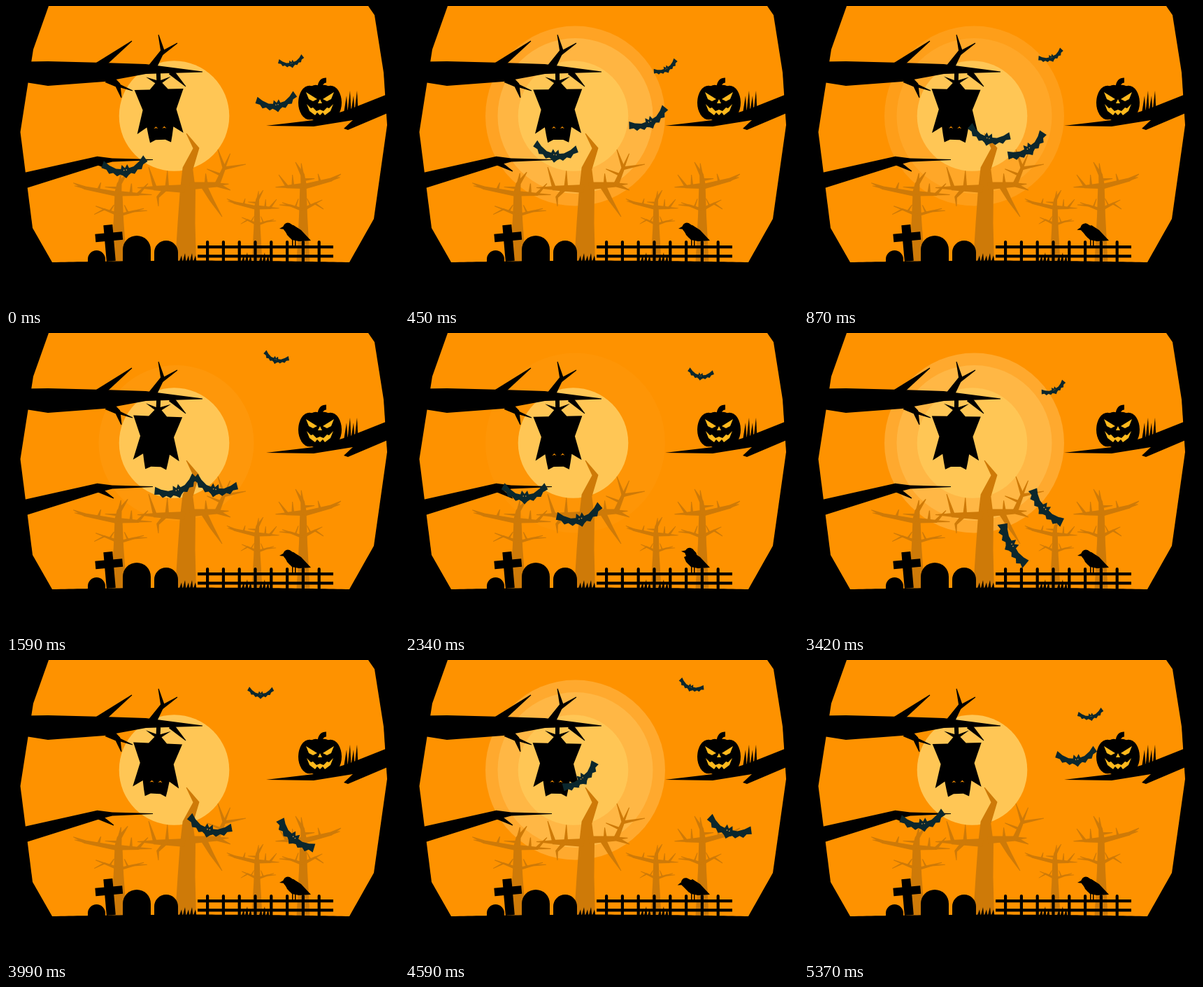
An HTML page with a canvas that plays this animation: 562x427 px, repeating every 5400 ms.

```html
<!DOCTYPE html>
<html lang="en">
<head>
<meta charset="utf-8">
<title>Halloween night</title>
<style>
html, body { margin: 0; width: 100%; height: 100%; overflow: hidden; background: #000; }
canvas { display: block; width: 562px; height: 427px; }
</style>
</head>
<body>
<canvas id="stage" width="562" height="427"></canvas>
<script>
const ctx = document.getElementById('stage').getContext('2d');
const LOOP = 5400, LAP = LOOP / 2, BEAT = LOOP / 4, BLINK = LOOP / 6, STEP = 30;
const TAU = Math.PI * 2, RAD = Math.PI / 180;
const INK = '#000', SKY = '#fe9200', MOON = '#ffc655', TREE = '#ce7a08', NIGHT = '#0b272d', FIRE = '#ffb91d';

const clamp = v => Math.min(1, Math.max(0, v));
const pulse = (t, a, b, c, d) => clamp((t - a) / (b - a)) * clamp((d - t) / (d - c));
const wave = (t, period, shift = 0) => Math.cos(TAU * t / period - shift * RAD);

function poly(color, p) {
  ctx.fillStyle = color;
  ctx.beginPath();
  for (let i = 0; i < p.length; i += 2) ctx.lineTo(p[i], p[i + 1]);
  ctx.closePath();
  ctx.fill();
}

// Closed outline from its right half
function mirror(color, half) {
  const left = [];
  for (let i = 0; i < half.length; i += 2) left.unshift(-half[i], half[i + 1]);
  poly(color, half.concat(left));
}

function oval(color, x, y, rx, ry = rx) {
  ctx.fillStyle = color;
  ctx.beginPath();
  ctx.ellipse(x, y, rx, ry, 0, 0, TAU);
  ctx.fill();
}

function place(x, y, deg, draw, sx = 1, sy = sx) {
  ctx.save();
  ctx.translate(x, y);
  ctx.rotate(deg * RAD);
  ctx.scale(sx, sy);
  draw();
  ctx.restore();
}

// Tapered limb through x, y, width triples
function limb(color, ...p) {
  const left = [], right = [], n = p.length / 3;
  for (let i = 0; i < n; i++) {
    const a = Math.max(i - 1, 0) * 3, b = Math.min(i + 1, n - 1) * 3, k = i * 3;
    const dx = p[b] - p[a], dy = p[b + 1] - p[a + 1];
    const w = p[k + 2] / 2 / Math.hypot(dx, dy);
    left.push(p[k] - dy * w, p[k + 1] + dx * w);
    right.unshift(p[k] + dy * w, p[k + 1] - dx * w);
  }
  poly(color, left.concat(right));
}

// Bent limb with one twig at its elbow and one before it
function bough(w, x0, y0, x1, y1, x2, y2) {
  const len = Math.hypot(x1 - x0, y1 - y0), ux = (x1 - x0) / len, uy = (y1 - y0) / len;
  const reach = .8 * Math.hypot(x2 - x1, y2 - y1), side = ux < 0 ? -1 : 1;
  const mx = x0 + (x1 - x0) * .6, my = y0 + (y1 - y0) * .6;
  limb(TREE, x0, y0, w, x1, y1, w * .65, x2, y2, 1);
  limb(TREE, x1 - ux, y1 - uy, w * .5, x1 + ux * reach, y1 + uy * reach, 1);
  limb(TREE, mx, my, w * .5, mx + uy * side * reach, my - ux * side * reach, 1);
}

function smallTree() {
  limb(TREE, 0, 0, 19, 0, -66, 12, 0, -112, 9);
  bough(9, 1, -107, -1, -125, -11, -143);
  bough(8, -2, -109, -23, -108, -35, -125);
  bough(8, 1, -108, 40, -118, 54, -126);
  bough(5, -1, -75, -18, -81, -34, -82);
  bough(5, 1, -76, 17, -84, 29, -76);
}

function bigTree() {
  limb(TREE, 257, 366, 30, 258, 310, 25, 260, 262, 22, 260, 232, 15, 272, 203, 9, 258, 182, 1);
  bough(12, 256, 261, 213, 260, 204, 230);
  limb(TREE, 231, 258, 7, 217, 273, 4, 218, 286, 1);
  bough(11, 263, 257, 302, 255, 321, 263);
  bough(8, 301, 257, 312, 231, 303, 205);
  limb(TREE, 311, 232, 5, 343, 226, 1);
  limb(TREE, 283, 257, 9, 294, 277, 6, 309, 301, 1);
}

function trees() {
  place(161, 366, 0, smallTree, -1.2, .9);
  place(359, 366, 0, smallTree, -.8, .72);
  place(425, 366, 0, smallTree);
  bigTree();
}

function tuft(x, y, count, gap, height) {
  for (let i = 0; i < count; i++) {
    const cx = x + i * gap, h = height * (i % 2 ? 1 : .75);
    poly(INK, [cx - 2.5, y, cx + 1, y - h, cx + 2.5, y]);
  }
}

function stone(x, y, w) {
  ctx.fillStyle = INK;
  ctx.beginPath();
  ctx.roundRect(x, y, w, 370 - y, [w / 2, w / 2, 0, 0]);
  ctx.fill();
}

function graveyard() {
  const ground = [66, 367];
  for (let x = 66; x <= 492; x += 6) ground.push(x, 366 - 2.4 * Math.sin((x - 66) / 426 * Math.PI));
  poly(INK, ground.concat(492, 367));
  stone(117, 349, 25);
  stone(167, 328, 40);
  stone(212, 335, 34);
  place(148, 338, -5, () => {
    ctx.fillRect(-6.5, -25.5, 13, 52);
    ctx.fillRect(-19.5, -14, 39, 11.5);
  });
  tuft(250, 366, 5, 5, 13);
  tuft(339, 366, 3, 5, 14);
  tuft(364, 366, 3, 5, 14);
  for (const y of [342, 355.2]) ctx.fillRect(274, y, 194, 4.2);
  for (let i = 0; i < 8; i++) {
    ctx.beginPath();
    ctx.roundRect(286 + i * 22.8, 335, 4.2, 32, 2);
    ctx.fill();
  }
}

function branches() {
  limb(INK, 26, 94, 29, 60, 96.5, 35, 140, 94.5, 27, 200, 90, 14, 281, 94, 1);
  limb(INK, 130, 88, 13, 180, 50, 1);
  limb(INK, 146, 103, 15, 160, 113, 8, 165, 131, 1);
  limb(INK, 160, 113, 5, 181, 121, 1);
  limb(INK, 209, 88, 12, 224, 64, 6, 218, 41, 1);
  limb(INK, 222, 68, 6, 245, 53, 1);
  limb(INK, 236, 94, 9, 257, 115, 1);
  limb(INK, 20, 251, 23, 132, 221, 13, 152, 220, 5, 210, 219.5, 1);
  limb(INK, 130, 222, 9, 142, 229, 5, 154, 236, 1);
  poly(INK, [372, 171, 440, 163, 490, 148, 548, 125, 548, 152, 489, 177, 483, 175, 496, 163, 440, 172]);
  tuft(486, 150, 4, 5, 29);
}

function pumpkin() {
  for (const dx of [-15, -6, 6, 15]) oval(INK, dx, 0, 16, 26 - Math.abs(dx) / 9);
  ctx.lineWidth = 7;
  ctx.beginPath();
  ctx.moveTo(0, -22);
  ctx.quadraticCurveTo(1, -32, 9, -32);
  ctx.stroke();
  for (const side of [-1, 1]) poly(FIRE, [side * 4, -5, side * 20, -15, side * 16, -5, side * 10, -2]);
  mirror(FIRE, [0, -5, 3, 1]);
  mirror(FIRE, [0, 10, 5, 12, 10, 7, 13, 8, 19, 2, 15, 12, 7, 18, 4, 14, 0, 18]);
}

function sleeper(t) {
  place(218, 98, .4 - 2.2 * wave(t, LAP), () => {
    mirror(INK, [1, -2, 3, -2, 3, 8, 18, 3, 5, 12, 13, 21, 35, 21, 24, 50, 33, 84, 19, 75, 17, 87, 15, 97, 7, 93]);
    if (Math.abs(t % BLINK - 720) < 70) return;
    for (const side of [-1, 1]) poly(SKY, [side * 3, 77, side * 6, 74, side * 9, 77, side * 6, 76]);
  });
}

function crow(t) {
  const u = t % LAP;
  const nod = 16 * pulse(u, 2000, 2300, 2400, 2650) - 8 * pulse(u, 1650, 1870, 1910, 2050) - 4 * pulse(u, 740, 860, 1000, 1200);
  poly(INK, [405, 317, 411, 313, 422, 320, 436, 335, 419, 336, 409, 334, 402, 327, 399, 320]);
  for (const x of [409, 413]) ctx.fillRect(x, 333, 1.5, 11);
  place(415, 329, nod, () => {
    oval(INK, -12, -13, 6.5);
    poly(INK, [-24, -11, -17, -15, -16, -10]);
    poly(INK, [-10, -19, -3, -15, 3, -6, -9, 2, -18, -10]);
  });
}

const WING = [0, -3, 4, -8, 6, -2, 13, -2, 22, -5, 29, -9, 34, 4, 27, 3, 24, 8, 18, 5, 13, 9, 8, 6, 4, 8, 0, 12];

// Wings lift as the bat levels out
function bat(x, y, tilt, size) {
  const lift = 1 - Math.abs(tilt) / 60;
  const rise = px => lift * (4 - 13 * (px / 33) ** 2);
  place(x, y, tilt, () => {
    mirror(NIGHT, WING.map((v, i) => i % 2 ? v + rise(WING[i - 1]) : v));
    for (const side of [-1, 1]) oval('#e0a04a', side * 1.8, rise(0), .8);
  }, size);
}

// Smooth cyclic curve through rows of [time, ...values]
function curve(keys, t) {
  const n = keys.length;
  const i = keys.findLastIndex(k => k[0] <= t);
  const at = k => keys[(k + n) % n];
  const when = k => at(k)[0] + Math.floor(k / n) * LOOP;
  const t0 = when(i), t1 = when(i + 1), span = t1 - t0, u = (t - t0) / span;
  return at(i).slice(1).map((a, c) => {
    const v = k => at(k)[c + 1], b = v(i + 1);
    const m0 = (b - v(i - 1)) / (t1 - when(i - 1)) * span;
    const m1 = (v(i + 2) - a) / (when(i + 2) - t0) * span;
    const u2 = u * u, u3 = u2 * u;
    return a + (b - a) * (3 * u2 - 2 * u3) + m0 * (u3 - 2 * u2 + u) + m1 * (u3 - u2);
  });
}

// time, x, y, tilt
const FLIGHTS = [
  [[0, 387, 138, -9], [870, 320, 202, -33], [1590, 299, 220, 12], [2340, 250, 262, -14], [3420, 345, 250, 48], [4590, 463, 241, 18]],
  [[0, 170, 231, -8], [870, 264, 186, 14], [1590, 244, 222, -20], [2340, 171, 229, 0], [3420, 298, 303, 60], [4590, 252, 168, -38]]
];

function bats(t) {
  for (const keys of FLIGHTS) {
    const [x, y, tilt] = curve(keys, t);
    bat(x, y, tilt, .75 + y / 1000);
  }
  bat(388 + 35 * wave(t, LAP, 305), 62 + 27 * wave(t, LAP, 48), -4 - 24 * wave(t, LAP, 70), .56);
}

function glow(radius, color, alpha) {
  ctx.globalAlpha = alpha;
  oval(color, 243.5, 157, radius);
  ctx.globalAlpha = 1;
}

function paint(t) {
  const beat = t % BEAT;
  ctx.fillStyle = INK;
  ctx.fillRect(0, 0, 562, 427);
  poly(SKY, [61, 0, 39, 62, 20.5, 180, 38, 317, 66, 366, 491, 366, 526, 304, 545, 170, 540, 95, 527, 13, 518, 0]);
  glow(128.5, '#ffa92e', pulse(beat, 270, 500, 740, 1030));
  glow(111, '#ffb745', pulse(beat, 200, 470, 720, 950));
  oval(MOON, 240.5, 157, 78.8);
  trees();
  graveyard();
  branches();
  place(449, 138, 0, pumpkin);
  sleeper(t);
  crow(t);
  bats(t);
}

const start = performance.now();
function tick(now) {
  const t = Math.max(0, now - start) % LOOP;
  paint(Math.floor(t / STEP) * STEP);
  requestAnimationFrame(tick);
}
paint(0);
requestAnimationFrame(tick);
</script>
</body>
</html>
```
